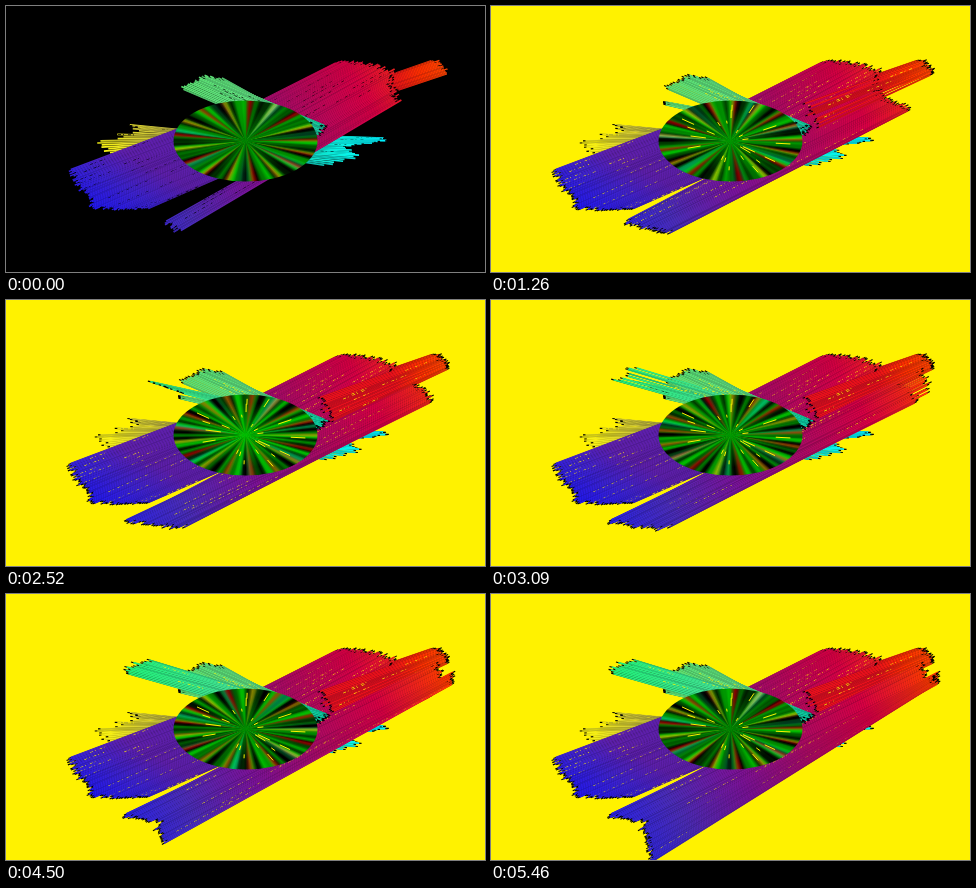
An HTML page with a canvas that plays this animation: 479 px wide and 266 px high, repeating every 5.49 s.

```html
<!DOCTYPE html>
<html>
<head>
<meta charset="utf-8">
<style>
html, body { margin: 0; width: 479px; height: 266px; overflow: hidden; background: #000 }
canvas { display: block }
</style>
</head>
<body>
<canvas id="stage" width="479" height="266"></canvas>
<script>
const ctx = document.getElementById('stage').getContext('2d');
const LOOP = 5490, STEP = 30, TAU = Math.PI * 2;
const CX = 239.5, CY = 135, RX = 72, RY = 40.5;

let seed = 7;
const rnd = () => (seed = (seed * 16807) % 2147483647) / 2147483647;

function ramp(x0, y0, x1, y1, ...colors) {
  const g = ctx.createLinearGradient(x0, y0, x1, y1);
  colors.forEach((c, i) => g.addColorStop(i / (colors.length - 1), c));
  return g;
}

const warm = ramp(95, 205, 400, 20, '#2422ee', '#4a2cb8', '#7c1298', '#ac0a64', '#d80044', '#ff3a00');
const blue = ramp(95, 205, 125, 150, '#2218f0', '#3d22d0', '#5e1fac');
const orange = ramp(385, 75, 445, 60, '#e8101c', '#ff3000', '#ff4a00');
const cyan = ramp(300, 145, 380, 135, '#10d8c0', '#08f4e8', '#00f0ff');
const yellow = ramp(90, 135, 175, 130, '#fffa10', '#d8d030', '#a8a040');
const green = ramp(170, 75, 320, 128, '#5ae070', '#60e080', '#08c8a0');
const mint = ramp(120, 70, 320, 128, '#20f078', '#40e090', '#08c8a0');

// Point at share u of a polyline given as x, y, x, y, ...
function along(p, u) {
  const n = p.length / 2 - 1, i = Math.min(n - 1, Math.floor(u * n)), f = u * n - i;
  return [0, 1].map(k => p[2 * i + k] * (1 - f) + p[2 * i + 2 + k] * f);
}

// Strokes joining two polylines; each one is born at a random time in [from, to].
const strokes = [];
function band(color, count, left, right, from = 0, to = 0, rough = 8) {
  for (let i = 0; i < count; i++) {
    const u = (i + .5) / count, [ax, ay] = along(left, u), [bx, by] = along(right, u);
    const len = Math.hypot(bx - ax, by - ay), dx = (bx - ax) / len, dy = (by - ay) / len;
    const s = rnd() * rough, e = len - rnd() * rough;
    strokes.push({
      color, dx, dy, born: from + rnd() * (to - from),
      x0: ax + dx * s, y0: ay + dy * s, x1: ax + dx * e, y1: ay + dy * e,
      dark: rnd() < .25, gap: rnd() < .3, at: rnd() * .8, size: .1 + rnd() * .25
    });
  }
}

band(orange, 22, [300, 98, 310, 112], [432, 52, 447, 66]);
band(yellow, 18, [120, 118, 127, 123, 88, 136, 92, 149], [210, 127, 210, 136], 0, 0, 14);
band(cyan, 28, [270, 128, 270, 140, 255, 150], [378, 132, 381, 135, 340, 141, 357, 150, 322, 161]);
band(warm, 66, [200, 122, 225, 132, 250, 145, 275, 164], [335, 54, 352, 55, 370, 57, 389, 63, 386, 79, 397, 93]);
band(blue, 72, [62, 164, 67, 180, 78, 190, 84, 203, 110, 205, 142, 203], [200, 112, 230, 122, 255, 121, 280, 128, 300, 134]);
band(warm, 14, [156, 217, 170, 228], [390, 86, 396, 94]);
band(warm, 32, [132, 216, 172, 228], [388, 82, 400, 103], 30, 540);
band(warm, 24, [132, 219, 178, 228], [398, 92, 423, 102], 570, 1260);
band(orange, 18, [310, 98, 325, 125], [432, 55, 447, 67], 600, 2500);
band(warm, 28, [115, 222, 170, 229], [412, 82, 430, 100], 1260, 2520);
band(warm, 26, [113, 223, 167, 232], [432, 68, 443, 91], 2520, 3720);
band(warm, 18, [148, 233, 156, 251], [447, 78, 447, 90], 3720, 4500);
band(warm, 24, [155, 244, 158, 270], [442, 82, 448, 88], 4500, 5440);
band(green, 24, [170, 81, 183, 72, 197, 69, 217, 72], [290, 132, 310, 130, 325, 122, 290, 114]);
band(green, 8, [170, 95, 175, 99], [318, 122, 308, 130], 30, 570);
band(mint, 12, [142, 81, 176, 93], [324, 121, 310, 130], 1260, 2520);
band(mint, 16, [142, 65, 121, 80], [325, 121, 302, 131], 2520, 3720);
band(mint, 8, [128, 68, 115, 77], [322, 122, 305, 130], 3720, 4500);

const sparks = Array.from({ length: 24 }, () =>
  ({ a: rnd() * TAU, r: .15 + rnd() * .6, len: .06 + rnd() * .16, born: 30 + rnd() * 600 }));

function line(x0, y0, x1, y1, style, width) {
  ctx.strokeStyle = style;
  ctx.lineWidth = width;
  ctx.beginPath();
  ctx.moveTo(x0, y0);
  ctx.lineTo(x1, y1);
  ctx.stroke();
}

function drawStroke(s, back) {
  const { x0, y0, x1, y1, dx, dy } = s;
  line(x0 - dx * 2.5, y0 - dy * 2.5, x1 + dx * 2.5, y1 + dy * 2.5, '#000', 1.1);
  line(x0, y0, x1, y1, s.color, 1.7);
  if (s.dark) line(x0, y0, x1, y1, 'rgba(0,0,30,.2)', 1);
  if (s.gap) {
    const w = x1 - x0, h = y1 - y0, e = s.at + s.size * .7;
    ctx.setLineDash([3, 2, 1, 4]);
    line(x0 + w * s.at, y0 + h * s.at, x0 + w * e, y0 + h * e, back, .8);
    ctx.setLineDash([]);
  }
}

function drawDisc(t, back) {
  const p = t / LOOP * TAU, rays = ctx.createConicGradient(0, 0, 0);
  for (let i = 0; i <= 180; i++) {
    const a = i / 180 * TAU;
    const v = .48 + .3 * Math.sin(11 * a + 1 + .6 * Math.sin(p))
      + .28 * Math.sin(26 * a + 2 * Math.sin(3 * p)) + .2 * Math.sin(43 * a + 4 * p);
    const g = Math.max(0, Math.min(1, v));
    const r = Math.max(0, Math.sin(17 * a + 2 + Math.sin(2 * p))) ** 3 * 135;
    const b = Math.max(0, Math.sin(7 * a + 3 + Math.sin(p))) ** 6 * 100 * g;
    rays.addColorStop(i / 180, `rgb(${r | 0},${g * 185 | 0},${b | 0})`);
  }
  ctx.save();
  ctx.translate(CX, CY);
  ctx.scale(RX, RY);
  ctx.beginPath();
  ctx.arc(0, 0, 1, 0, TAU);
  ctx.fillStyle = rays;
  ctx.fill();
  const bright = 175 + 45 * Math.sin(5 * p - 1.5) | 0;
  const core = ctx.createRadialGradient(0, 0, 0, 0, 0, .8);
  core.addColorStop(0, `rgba(0,${bright},0,1)`);
  core.addColorStop(.3, `rgba(0,${bright},0,.55)`);
  core.addColorStop(1, `rgba(0,${bright},0,0)`);
  ctx.fillStyle = core;
  ctx.fill();
  ctx.restore();
  for (const { a, r, len, born } of sparks) {
    if (t < born) continue;
    const x = RX * Math.cos(a), y = RY * Math.sin(a), e = r + len;
    line(CX + x * r, CY + y * r, CX + x * e, CY + y * e, back, 1);
  }
}

function draw(t) {
  const back = t < STEP ? '#000' : '#fff200';
  ctx.fillStyle = back;
  ctx.fillRect(0, 0, 479, 266);
  for (const s of strokes) if (t >= s.born) drawStroke(s, back);
  drawDisc(t, back);
}

let start;
function tick(now) {
  start ??= now;
  draw(Math.floor((now - start) % LOOP / STEP) * STEP);
  requestAnimationFrame(tick);
}
draw(0);
requestAnimationFrame(tick);
</script>
</body>
</html>
```
